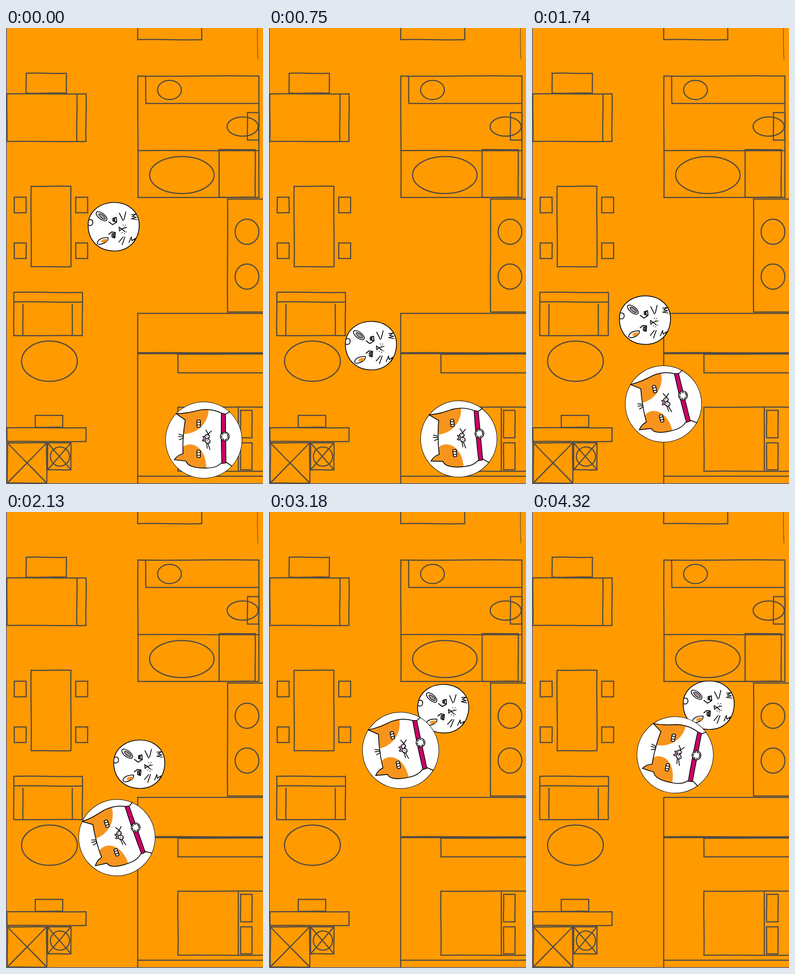
Animation, 562 px wide and 997 px high, one loop 4350 ms. Source, as an HTML page:

```html
<!DOCTYPE html>
<html lang="en">
<head>
<meta charset="utf-8">
<title>Cats in the flat</title>
<style>
  html, body { margin: 0; width: 100%; height: 100%; overflow: hidden; background: #ff9a00; }
  svg { display: block; width: 100vw; height: 100vh; }
  path, ellipse, circle { stroke-linecap: round; stroke-linejoin: round; }
  #room { fill: none; stroke: #504a44; stroke-width: 2.5; }
  .ink { fill: none; stroke: #000; stroke-width: 1.7; }
  .white { fill: #fff; stroke: #000; stroke-width: 1.7; }
  .patch { fill: #f7941d; }
  .nose { fill: #b57fb5; stroke: #000; stroke-width: 1.3; }
  .dots { fill: none; stroke: #000; stroke-width: 1.8; }
</style>
</head>
<body>
<svg viewBox="0 0 562 997" preserveAspectRatio="none">
  <rect width="562" height="997" fill="#ff9a00"/>
  <g id="room">
    <path d="M1 0V997" stroke="#77707a" stroke-width="2"/>
    <path d="M0 996H562" stroke="#77707a" stroke-width="2"/>
    <path d="M550 0Q549 30 551 68" stroke-width="1.2"/>
  </g>

  <g id="small">
    <path class="white" d="M238 381.5C269 382 291 403 291.3 431C291 465 268 488 236 487.500C203 487 179.500 465 179.500 431C180 402 205 381 238 381.500Z"/>
    <path class="ink" d="M181 420C186 417 190 420 190 425C190 431 185 433 180 431" stroke-width="1.4"/>
    <ellipse class="white" cx="209" cy="411.500" rx="14" ry="6.500" transform="rotate(38 209 411.500)"/>
    <ellipse cx="210" cy="412" rx="9" ry="3.500" transform="rotate(38 210 412)" fill="#a990aa" stroke="#000" stroke-width="1.300"/>
    <path class="ink" d="M200 472C199 464 207 458 223 458C225 464 216 473 202 473"/>
    <ellipse class="patch" cx="214.500" cy="465.500" rx="7" ry="3.500" transform="rotate(-18 214 465)"/>
    <g class="ink">
      <path d="M225 424L233 430L241 425M234 416L241 414L242 424L234 422Z" stroke-width="2"/>
      <path d="M225 451L231 446L239 447M232 450L239 449L238 459L232 457Z" stroke-width="2"/>
      <path d="M237 417V421M235.500 452V456" stroke-width="2.800"/>
      <path d="M248 405L256 421M262 402L258 419M247 468L256 457M254 474L260 457"/>
      <path d="M254 439L264 436M254 440L260 445"/>
      <path d="M274 408L284 407L276 412L285 414L274 417L286 419M269 469L274 457L275 465L283 460L279 469"/>
    </g>
    <path class="nose" d="M247 435L254 439L248 444Z"/>
    <path class="dots" d="M256 431h.1M261 431h.1M259 435h.1M254 447h.1M259 449h.1M263 446h.1"/>
  </g>

  <g id="big">
    <circle cx="432.500" cy="901" r="83.500" fill="#fff" stroke="#000" stroke-width="1"/>
    <path class="patch" d="M372 843C396 842 420 834 443 834C443 858 425 886 389 888L392 857Z"/>
    <path class="patch" d="M388 915C409 901 438 920 438 962C420 964 400 960 394 947L368 943L386 931Z"/>
    <path class="ink" d="M471 842C455 834 440 833 425 835C408 839 396 843 372 843L392 857C389 875 386 905 387 931C378 933 373 937 368 944L394 947C397 960 420 963 441 962C455 962 465 957 471 951"/>
    <path class="ink" d="M378 888L388 891M377 893L388 894M379 900L388 897M481 844L489 839M481 949L494 958" stroke-width="1.300"/>
    <g class="white">
      <rect x="417.500" y="857" width="7.500" height="16" rx="2.500"/>
      <rect x="417.500" y="923" width="7.500" height="16" rx="2.500"/>
      <path class="ink" d="M418 862H425M418 868H425M418 928H425M418 934H425" stroke-width="1.500"/>
    </g>
    <g class="ink" stroke-width="1.300">
      <path d="M436 897C433 890 439 887 443 890C447 893 445 898 438 898C446 898 448 904 445 907C440 911 434 906 436 899"/>
      <path d="M443 889L437 879M442 888L449 881M442 909L446 922M439 909L440 919"/>
    </g>
    <path class="nose" d="M430 893C433 892 437 894 437 897L436 903C432 904 429 903 429 901L433 899Z"/>
    <path class="dots" d="M439 892h.1M442 895h.1M440 902h.1M443 905h.1M439 906h.1" stroke-width="1.400"/>
    <path d="M471 842L480 844L481 951L472 952Q470 900 471 842Z" fill="#cc0066" stroke="#000" stroke-width="1.500"/>
    <circle class="white" cx="478.500" cy="893" r="9.700" stroke-width="1.300"/>
    <circle class="ink" cx="478.500" cy="893" r="7" stroke-width="1.500" stroke-dasharray="3.500 3"/>
  </g>
</svg>
<script>
const NS = "http://www.w3.org/2000/svg";
const room = document.getElementById("room");

function add(tag, attrs) {
  const el = document.createElementNS(NS, tag);
  for (const key in attrs) el.setAttribute(key, attrs[key]);
  room.append(el);
}

// A hand-drawn stroke: bowed slightly, by an amount fixed by its place.
function line(x1, y1, x2, y2) {
  const len = Math.hypot(x2 - x1, y2 - y1);
  const bow = Math.min(1.6, len / 50) * Math.sin(x1 * 1.3 + y1 * 2.1 + x2);
  const nx = (y2 - y1) / len * bow, ny = (x1 - x2) / len * bow;
  const at = (k, side) =>
    `${x1 + (x2 - x1) * k + nx * side} ${y1 + (y2 - y1) * k + ny * side}`;
  add("path", { d: `M${x1} ${y1}C${at(.35, 1)} ${at(.65, -1)} ${x2} ${y2}` });
}
function box(l, t, r, b) {
  line(l, t, r, t); line(r, t, r, b); line(l, b, r, b); line(l, t, l, b);
}
function oval(cx, cy, rx, ry) { add("ellipse", { cx, cy, rx, ry }); }

// Bathroom
box(288, -6, 428, 25.5);
box(288.5, 105, 553, 370.5);
line(305, 106, 306, 165); line(306, 165, 553, 165);
line(288, 268, 553, 268);
oval(357.5, 135.5, 26, 21);
oval(517.5, 215.5, 34, 21); box(528, 185, 553, 245);
oval(384.5, 321.5, 70.5, 40.5); box(466, 266, 545, 370);

// Kitchen
box(484.5, 374, 570, 621);
oval(527, 445.5, 26, 27.5); oval(527, 543.5, 26, 27.5);

// Bedroom
line(288, 624, 562, 624); line(288, 624, 288, 995);
line(288, 710, 562, 710); line(288, 712, 562, 712);
box(376, 713, 570, 754);
box(376, 829, 570, 969); line(508, 829, 508, 969);
box(513, 836, 538, 896); box(513, 907, 538, 966);
line(288, 980, 562, 980);

// Living side
box(44, 99, 132, 142.5);
box(2, 144, 175, 248); line(155, 145, 155, 248);
box(55, 346, 142, 522);
for (const x of [18, 152.5]) for (const y of [370, 470]) box(x, y, x + 26, y + 34);
box(17, 578, 167, 672.5); line(17, 599, 167, 599);
line(37, 604, 37, 672); line(145, 604, 145, 672);
oval(95, 728.5, 61, 44);
box(64, 847, 124, 873); box(2, 874, 175, 904);
box(3, 907, 89, 995); line(3, 907, 89, 995); line(89, 907, 3, 995);
box(91, 907, 142, 966); line(91, 907, 142, 966); line(142, 907, 91, 966);
oval(118, 937, 21, 21);

// Monotone cubic through [time, value] keys.
function track(keys) {
  const slope = keys.slice(1).map((k, i) => (k[1] - keys[i][1]) / (k[0] - keys[i][0]));
  const tangent = keys.map((_, i) => {
    if (i === 0) return slope[0];
    if (i === slope.length) return slope[i - 1];
    const a = slope[i - 1], b = slope[i];
    return a * b <= 0 ? 0 : 2 * a * b / (a + b);
  });
  return t => {
    let i = 0;
    while (i < slope.length - 1 && t > keys[i + 1][0]) i++;
    const [t0, v0] = keys[i], [t1, v1] = keys[i + 1];
    const h = t1 - t0, u = (t - t0) / h, w = 1 - u;
    return v0 * (1 + 2 * u) * w * w + v1 * u * u * (3 - 2 * u)
      + h * u * w * (tangent[i] * w - tangent[i + 1] * u);
  };
}

const cats = [
  {
    el: document.getElementById("small"), cx: 235.5, cy: 434.5,
    x: track([[0, 235.5], [540, 223], [1380, 223.5], [1620, 237], [2130, 291.5],
      [2640, 366.5], [2700, 375.5], [3240, 381.5], [3720, 386.5], [4320, 386.5]]),
    y: track([[0, 434.5], [540, 648], [750, 694.5], [1380, 787], [1620, 673.5], [2130, 551.5],
      [2640, 453.5], [2700, 441], [3240, 429], [3720, 422.5], [4320, 422.5]]),
    turn: track([[0, 0], [2700, 0], [3720, 7], [4320, 0]])
  },
  {
    el: document.getElementById("big"), cx: 432.5, cy: 901,
    x: track([[0, 432.5], [540, 419], [750, 415], [1110, 419], [1380, 376], [1620, 306],
      [2130, 242.5], [2230, 231], [2640, 261.5], [2700, 266], [3240, 289], [3720, 293], [4320, 313]]),
    y: track([[0, 901], [540, 899], [1110, 897.5], [1380, 878], [1620, 847], [2130, 712],
      [2640, 563], [2700, 545.5], [3240, 520], [3720, 515], [4320, 531]]),
    turn: track([[0, 0], [750, -4.8], [1380, -7.4], [2130, -18.8], [2640, -9.1],
      [3720, -13.8], [4320, 11.3]])
  }
];

const LOOP = 4350, STEP = 30;
const start = performance.now();

function draw() {
  const elapsed = Math.max(0, performance.now() - start) % LOOP;
  const t = Math.floor(elapsed / STEP) * STEP;
  for (const c of cats) {
    c.el.setAttribute("transform",
      `translate(${c.x(t)} ${c.y(t)}) rotate(${c.turn(t)}) translate(${-c.cx} ${-c.cy})`);
  }
  requestAnimationFrame(draw);
}
draw();
</script>
</body>
</html>
```
